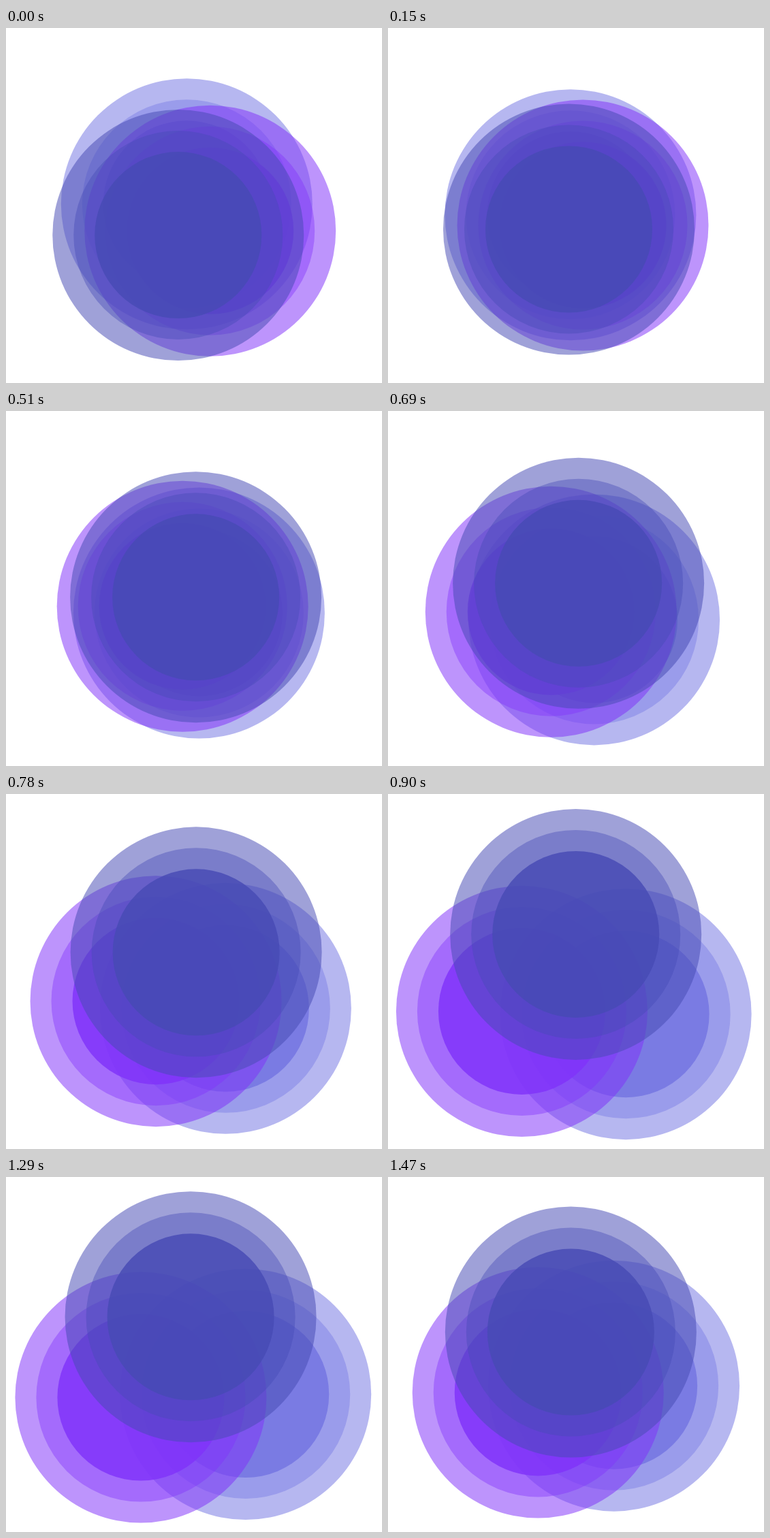
Animation of 552 by 522 pixels, one loop 1500 ms. Source, as an HTML page with a canvas:

```html
<!DOCTYPE html>
<html>
<head>
<meta charset="utf-8">
<style>
  html, body { margin: 0; width: 100%; height: 100%; overflow: hidden; background: #fff; }
  canvas { display: block; }
</style>
</head>
<body>
<canvas id="stage" width="552" height="522"></canvas>
<script>
const ctx = document.getElementById('stage').getContext('2d');
const LOOP = 1500;
const CENTER = { x: 273.5, y: 286.5 };

// Back to front; x and y are offsets from the centre at spread 1.
const discs = [
  { x: 76.5, y: 35, color: 'rgb(115,117,226)' },
  { x: -76, y: 35, color: 'rgb(128,50,250)' },
  { x: 0, y: -80, color: 'rgb(71,75,181)' }
];

// Radius and opacity of the stacked circles in each disc.
const rings = [[184.5, 0.52], [153.5, 0.42], [122.5, 0.82]];

// Time, signed spread, counterclockwise turn in degrees.
// The spread changes sign as the discs pass through the centre.
const keys = [
  [-210, -0.735, -55],
  [0, -0.345, -49],
  [300, 0, -31],
  [510, 0.17, -22],
  [690, 0.42, -10.5],
  [900, 1, -1.6],
  [1095, 1.145, 0],
  [1290, 1.01, 1.7],
  [1470, 0.735, 5],
  [1680, 0.345, 11]
];

const slope = (i, col) =>
  (keys[i + 1][col] - keys[i - 1][col]) / (keys[i + 1][0] - keys[i - 1][0]);

// Cubic Hermite interpolation of one key column.
function sample(t, col) {
  let i = 1;
  while (i < keys.length - 3 && t >= keys[i + 1][0]) i++;
  if (t >= keys[i + 1][0]) {
    const [a, b] = [keys[i + 1], keys[i + 2]];
    return a[col] + (b[col] - a[col]) * (t - a[0]) / (b[0] - a[0]);
  }
  const [a, b] = [keys[i], keys[i + 1]];
  const span = b[0] - a[0];
  const u = (t - a[0]) / span;
  const v = 1 - u;
  return a[col] * v * v * (1 + 2 * u) + b[col] * u * u * (3 - 2 * u) +
    span * u * v * (slope(i, col) * v - slope(i + 1, col) * u);
}

function draw(t) {
  const spread = sample(t, 1);
  const turn = sample(t, 2) * Math.PI / 180;
  const cos = Math.cos(turn) * spread;
  const sin = Math.sin(turn) * spread;

  ctx.globalAlpha = 1;
  ctx.fillStyle = '#fff';
  ctx.fillRect(0, 0, 552, 522);
  for (const { x, y, color } of discs) {
    ctx.fillStyle = color;
    for (const [radius, alpha] of rings) {
      ctx.globalAlpha = alpha;
      ctx.beginPath();
      ctx.arc(CENTER.x + x * cos + y * sin, CENTER.y - x * sin + y * cos, radius, 0, 2 * Math.PI);
      ctx.fill();
    }
  }
}

function tick() {
  draw(performance.now() % LOOP);
  requestAnimationFrame(tick);
}
tick();
</script>
</body>
</html>
```
